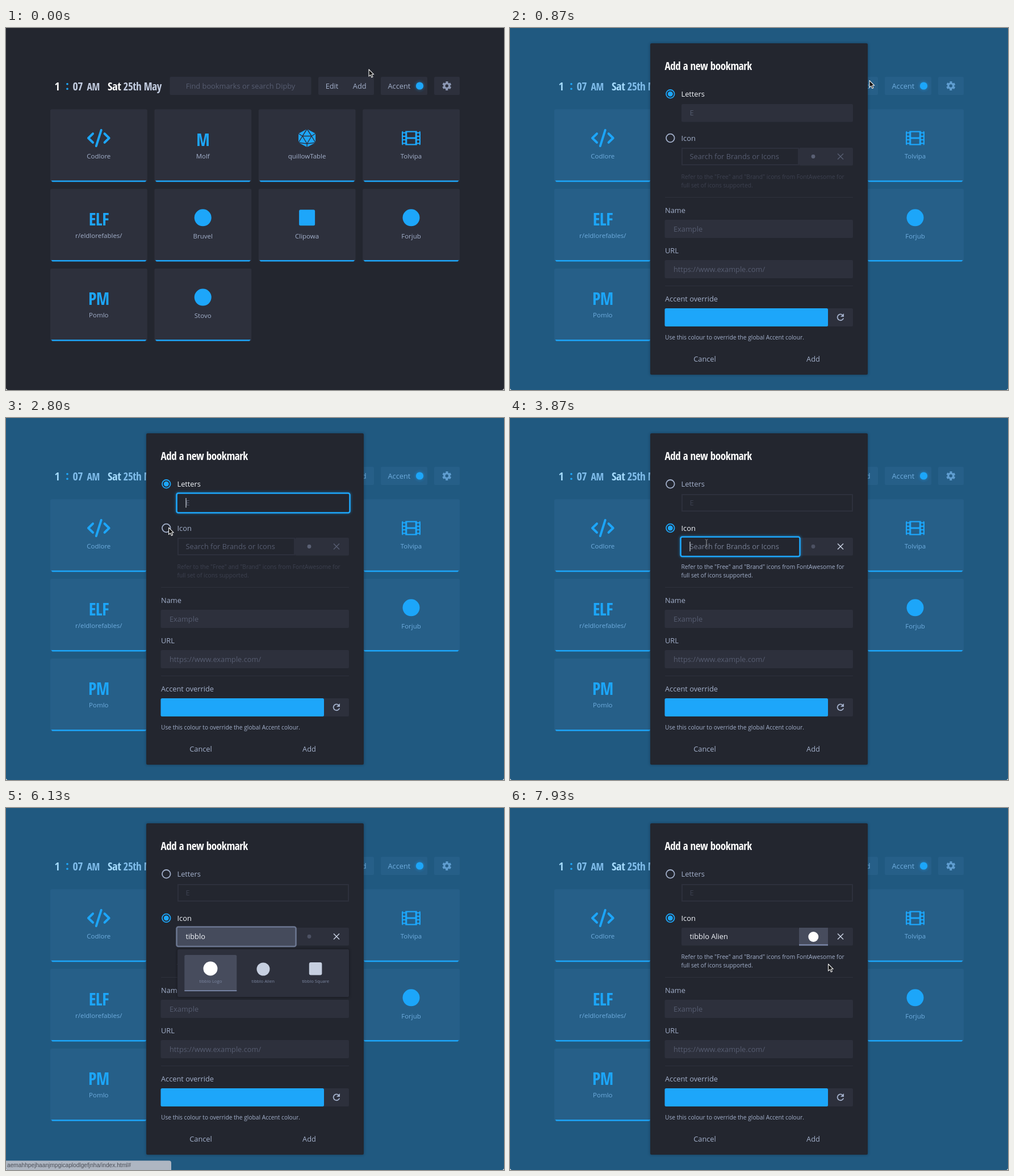
An HTML page for the animation above (8 s loop, 877 by 638 pixels).

```html
<!DOCTYPE html>
<html lang="en">
<head>
<meta charset="utf-8">
<title>Bookmark start page</title>
<style>
html, body { margin: 0; width: 100%; height: 100%; overflow: hidden; background: #fff; }
svg { display: block; width: 877px; height: 638px; border-radius: 0 0 4px 4px; }
text { font: 12.8px 'Open Sans', 'Noto Sans', sans-serif; fill: #a3b0cb; white-space: pre; }
.label { font-size: 11.5px; text-anchor: middle; }
.mid { text-anchor: middle; }
.help { font-size: 10.2px; }
.tiny { font-size: 7.7px; text-anchor: middle; fill: #7d88a3; }
.hint { fill: #565c70; }
.bright-hint { fill: #777f93; }
.dim { fill: #3d4150; }
.on { fill: #f2f5fa; }
.head { font: 700 22px 'Open Sans Condensed', 'Roboto Condensed', 'Open Sans', sans-serif; font-stretch: 75%; letter-spacing: -.02em; fill: #c3cde1; }
.big { font-size: 30px; text-anchor: middle; }
.accent { fill: #1da6fa; }
.white { fill: #fff; }
.status { font: 10.2px 'Liberation Sans', Arial, sans-serif; fill: #4b4f58; }
</style>
</head>
<body>
<svg viewBox="0 0 877 638">
  <defs>
    <filter id="soft" x="-100%" y="-100%" width="300%" height="300%"><feGaussianBlur stdDeviation="2.5"/></filter>
  </defs>
  <g id="page"></g>
  <rect id="veil" width="877" height="638" fill="#1da6fa"/>
  <g id="modal"><g id="form"></g><g id="live"></g></g>
  <g id="top"></g>
</svg>
<script>
const LOOP = 8000;
const ACCENT = '#1da6fa', BASE = '#23262f', PANEL = '#2d303c', LIT = '#474c5d', GREY = '#7480a0', TEXT = '#a3b0cb';
const $ = id => document.getElementById(id);

const rect = (x, y, w, h, fill, extra = '') =>
  `<rect x="${x}" y="${y}" width="${w}" height="${h}" fill="${fill}" ${extra}/>`;
const disc = (x, y, r, fill, extra = '') => `<circle cx="${x}" cy="${y}" r="${r}" fill="${fill}" ${extra}/>`;
const line = (d, color, width, extra = '') =>
  `<path d="${d}" fill="none" stroke="${color}" stroke-width="${width}" ${extra}/>`;
const text = (x, y, str, cls = '', max = 0) =>
  `<text x="${x}" y="${y}" class="${cls}" ${max ? `data-max="${max}"` : ''}>${str}</text>`;
const round = 'rx="2.5"';

// Sprocket holes: three squares between two half notches
const sprockets = x => [-8.3, -2.1, 4.1].map(y => rect(x, y, 4.1, 4.1, PANEL, 'rx=".8"')).join('') +
  rect(x, -13, 4.1, 2.6, PANEL) + rect(x, 10.4, 4.1, 2.6, PANEL);

// Tile icons, drawn around their own centre
const icons = {
  code: line('M-10.3 -7.8l-8 7.8l8 7.8M10.3 -7.8l8 7.8l-8 7.8M4.4 -14l-8.8 28', ACCENT, 4, 'stroke-linecap="round" stroke-linejoin="round"'),
  dice: `<path d="M0 -16L15 -8V8L0 16L-15 8V-8Z" fill="${ACCENT}"/>` +
    line('M-8 -3.5H8L0 10ZM0 -16L-8 -3.5L-15 -8M0 -16L8 -3.5L15 -8M-8 -3.5L-15 8L0 10L15 8L8 -3.5M0 10V16', PANEL, 1.4),
  film: rect(-16.5, -12.4, 33, 24.8, ACCENT, round) + sprockets(-14.4) + sprockets(10.3) +
    [-10.3, 1.5].map(y => rect(-7.2, y, 14.4, 8.8, PANEL, 'rx=".8"')).join(''),
  square: rect(-14, -14, 28, 28, ACCENT, round),
  circle: disc(0, 0, 15, ACCENT)
};

const tiles = [
  ['Codlore', 'code'], ['Molf', '', 'M'], ['quillowTable', 'dice'], ['Tolvipa', 'film'],
  ['r/eldlorefables/', '', 'ELF'], ['Bruvel', 'circle'], ['Clipowa', 'square'], ['Forjub', 'circle'],
  ['Pomlo', '', 'PM'], ['Stovo', 'circle']
];

function tile([name, icon, letters], i) {
  const x = 78 + 183.4 * (i % 4), y = 143.3 + 140.3 * Math.floor(i / 4), cx = x + 85.3;
  return rect(x, y, 170.8, 127.8, PANEL, round) +
    `<path d="M${x + 1.5} ${y + 125.4}h167.8l-2 2.5h-163.8z" fill="${ACCENT}"/>` +
    (letters ? text(cx, y + 64.5, letters, 'head big accent', 37)
             : `<g transform="translate(${cx} ${y + 50.7})">${icons[icon]}</g>`) +
    text(cx, y + (letters ? 86.5 : 87), name, 'label');
}

$('page').innerHTML =
  rect(0, 0, 877, 638, BASE) +
  text(85.5, 110, '1', 'head white', 9) + text(105, 109, ':', 'head accent', 8) +
  text(117.5, 110, '07', 'head', 18) + text(142.5, 110, 'AM', 'head', 23) +
  text(179, 110, 'Sat', 'head white', 24) + text(206.5, 110, '25th May', 'head', 69) +
  rect(288.5, 86, 249, 32, PANEL, round) + text(413, 106.7, 'Find bookmarks or search Dipby', 'mid hint') +
  rect(550, 86, 98, 32, PANEL, round) + text(574, 106.7, 'Edit', 'mid') +
  `<g id="hover">${rect(598, 86, 50, 32, '#535a6c', round)}${rect(598.5, 115.6, 49, 2.6, ACCENT)}</g>` +
  `<text id="add" x="622.7" y="106.7" class="mid">Add</text>` +
  rect(660, 86, 82, 32, PANEL, round) + text(672.5, 106.7, 'Accent') +
  disc(728.5, 102, 7.5, ACCENT, 'opacity=".4" filter="url(#soft)"') + disc(728.5, 102, 6.6, ACCENT) +
  rect(754, 86, 45, 32, PANEL, round) +
  disc(776.3, 102, 4.4, 'none', 'stroke="#8d99b5" stroke-width="3.4"') +
  disc(776.3, 102, 6.7, 'none', 'stroke="#8d99b5" stroke-width="2.6" stroke-dasharray="4 3.016" transform="rotate(13 776.3 102)"') +
  tiles.map(tile).join('');

const field = (y, hint) => rect(272.5, y, 331.5, 32, PANEL, round) + text(288, y + 21, hint, 'hint');
const rule = y => rect(273, y, 331, 1, PANEL);

$('form').innerHTML =
  rect(247, 27, 383, 584, '#000', 'opacity=".3" filter="url(#soft)"') +
  rect(247, 27, 383, 584, BASE, round) +
  text(272.5, 74, 'Add a new bookmark', 'head white', 154) +
  rule(298) + text(273, 326, 'Name') + field(338, 'Example') +
  text(273, 397, 'URL') + field(409, 'https://www.example.com/') +
  rule(454) + text(273, 481.7, 'Accent override') +
  rect(272.5, 494, 331.5, 32, PANEL, round) + rect(272.5, 494, 287.5, 32, ACCENT, round) +
  line('M586.3 506.5A5.4 5.4 0 1 0 587.2 511.5', TEXT, 1.8) + `<path d="M588 503v6h-6z" fill="${TEXT}"/>` +
  text(273, 549.3, 'Use this colour to override the global Accent colour.', 'help') +
  text(343, 587.7, 'Cancel', 'mid') + text(534, 587.7, 'Add', 'mid');

// The condensed faces differ in width: use the largest size that fits
document.querySelectorAll('[data-max]').forEach(el => {
  let size = parseFloat(getComputedStyle(el).fontSize);
  while (el.getComputedTextLength() > +el.dataset.max && size > 12) el.style.fontSize = (size -= .5) + 'px';
});

const clamp = v => Math.max(0, Math.min(1, v));
const ease = (t, from, to) => { const k = clamp((t - from) / (to - from)); return k * k * (3 - 2 * k); };

// time, x, y of the pointer
const path = [[0, 639, 73], [150, 639, 73], [480, 633, 92.5], [950, 633, 92.5], [1650, 470, 153], [2250, 470, 153],
  [2850, 283, 194], [3050, 283, 194], [3450, 346, 221], [7230, 346, 221], [7880, 560.5, 275], [LOOP, 560.5, 275]];

function pointerAt(t) {
  const i = path.findIndex(p => p[0] > t), a = path[i - 1], b = path[i], k = ease(t, a[0], b[0]);
  return [a[1] + (b[1] - a[1]) * k, a[2] + (b[2] - a[2]) * k];
}

const inside = ([px, py], x, y, w, h) => px > x && px < x + w && py > y && py < y + h;

const radio = (y, label, on) =>
  disc(282.3, y, 7.3, 'none', `stroke="${on ? ACCENT : TEXT}" stroke-width="1.8"`) +
  (on ? disc(282.3, y, 4.5, ACCENT) : '') + text(301.5, y + 4.8, label, on ? 'on' : '');

function input(y, w, state) {
  if (state === 'off') return rect(303, y + 1, w - 2, 29, BASE, `stroke="${PANEL}" stroke-width="2"`);
  if (state === 'idle') return rect(302, y, w, 31.5, PANEL, round);
  const focus = state === 'focus';
  return (focus ? rect(299, y - 3, w + 6, 37, ACCENT, 'rx="4" opacity=".5" filter="url(#soft)"') : '') +
    rect(300.5, y - 1.5, w + 3, 34.5, focus ? BASE : '#454b5c', `stroke="${focus ? ACCENT : '#6b7690'}" stroke-width="2.6" rx="3"`);
}

const caret = (x, y, t) => Math.floor(t / 500) % 2 ? rect(x, y, 1, 17, '#e8edf5') : '';

function results(active) {
  const shapes = [c => disc(360, 283, 12.5, c), c => disc(453, 284, 11.5, c), c => rect(533.8, 272, 22.6, 22.6, c, 'rx="3"')];
  return rect(302, 249, 302, 84, '#000', 'opacity=".4" filter="url(#soft)"') + rect(302, 249, 302, 84, PANEL, round) +
    ['Logo', 'Alien', 'Square'].map((kind, i) => {
      const cx = 360.3 + 92.4 * i, on = i === active;
      return (on ? rect(cx - 46, 259, 92, 64, LIT, round) + rect(cx - 46, 321, 92, 2, GREY) : '') +
        shapes[i](on ? '#fff' : '#c6cfe0') + text(cx, 308, 'tibblo ' + kind, 'tiny');
    }).join('');
}

function live(t, mouse) {
  const iconMode = t > 2950, chosen = t > 6900;
  const lettersState = iconMode ? 'off' : t > 1700 ? 'focus' : inside(mouse, 302, 134, 302, 31) ? 'hover' : 'idle';
  const iconState = !iconMode ? 'off' : t > 3400 && t < 5450 ? 'focus' : inside(mouse, 302, 211, 207, 32) ? 'hover' : 'idle';
  const query = chosen ? 'tibblo Alien' : 'tibblo'.slice(0, Math.max(0, Math.floor((t - 4250) / 130)));
  const help = 'help' + (iconMode ? '' : ' dim');
  let s = radio(116.3, 'Letters', !iconMode) + input(134, 302, lettersState) +
    text(316.5, 154, 'E', iconMode ? 'dim' : 'hint') + (lettersState === 'focus' ? caret(316.5, 141, t) : '');

  s += radio(194, 'Icon', iconMode) + rect(509, 211, 95, 31.5, PANEL, round);
  if (chosen) {
    s += rect(509, 211, 51, 31.5, iconState === 'hover' ? '#3c404f' : LIT) + rect(509, 240, 51, 2.6, GREY) +
      disc(534.3, 227, 9, '#fff');
  } else {
    s += disc(534, 226.5, 3.4, iconMode ? '#4c5163' : '#5a6074');
  }
  s += line('M577 221.5l10 10m0 -10l-10 10', iconMode ? '#c6cfe0' : '#565c70', 1.5) + input(211, 207, iconState);
  s += text(316.5, 231, query || 'Search for Brands or Icons', query ? 'on' : iconMode ? 'bright-hint' : 'hint');
  if (iconState === 'focus' && !query) s += caret(316.5, 218, t);
  s += text(301.5, 266, 'Refer to the "Free" and "Brand" icons from FontAwesome for', help) +
    text(301.5, 281, 'full set of icons supported.', help);
  if (query.length > 1 && !chosen) s += results(t < 5700 ? -1 : t < 6250 ? 0 : 1);
  return s;
}

function pointer(t, mouse) {
  if (t > 5450 && t < 7250) return '';
  const beam = t > 950 && (inside(mouse, 302, 134, 302, 31) || inside(mouse, 302, 211, 207, 32));
  const shape = beam
    ? line('M-2.5 -7q2.5 0 2.5 2v10q0 2 -2.5 2M2.5 -7q-2.5 0 -2.5 2v10q0 2 2.5 2M-1.5 2h3', '#74787f', 1)
    : '<path d="M0 0V12.2L2.9 9.6L4.9 14L7 13.1L5.1 8.8H8.8Z" fill="#111" stroke="#eee" stroke-width="1.1" stroke-linejoin="round"/>';
  return `<g transform="translate(${mouse[0]} ${mouse[1]})">${shape}</g>`;
}

function frame() {
  const t = performance.now() % LOOP, mouse = pointerAt(t);
  const hovered = t > 380 && t < 860;
  $('hover').style.opacity = hovered ? 1 : 0;
  $('add').style.fill = hovered ? '#fff' : TEXT;
  $('veil').style.opacity = .4 * ease(t, 520, 700);
  $('modal').style.opacity = ease(t, 720, 870);
  $('live').innerHTML = live(t, mouse);
  const status = t > 5700 && t < 7100
    ? `<path d="M0 621.5H287q4 0 4 4V638H0Z" fill="#aeb6c2"/>` +
      text(2, 633.3, 'aemahhpejhaanjmpgicaplodlgefjnha/index.html#', 'status') : '';
  $('top').innerHTML = status + pointer(t, mouse);
  requestAnimationFrame(frame);
}
frame();
</script>
</body>
</html>
```
